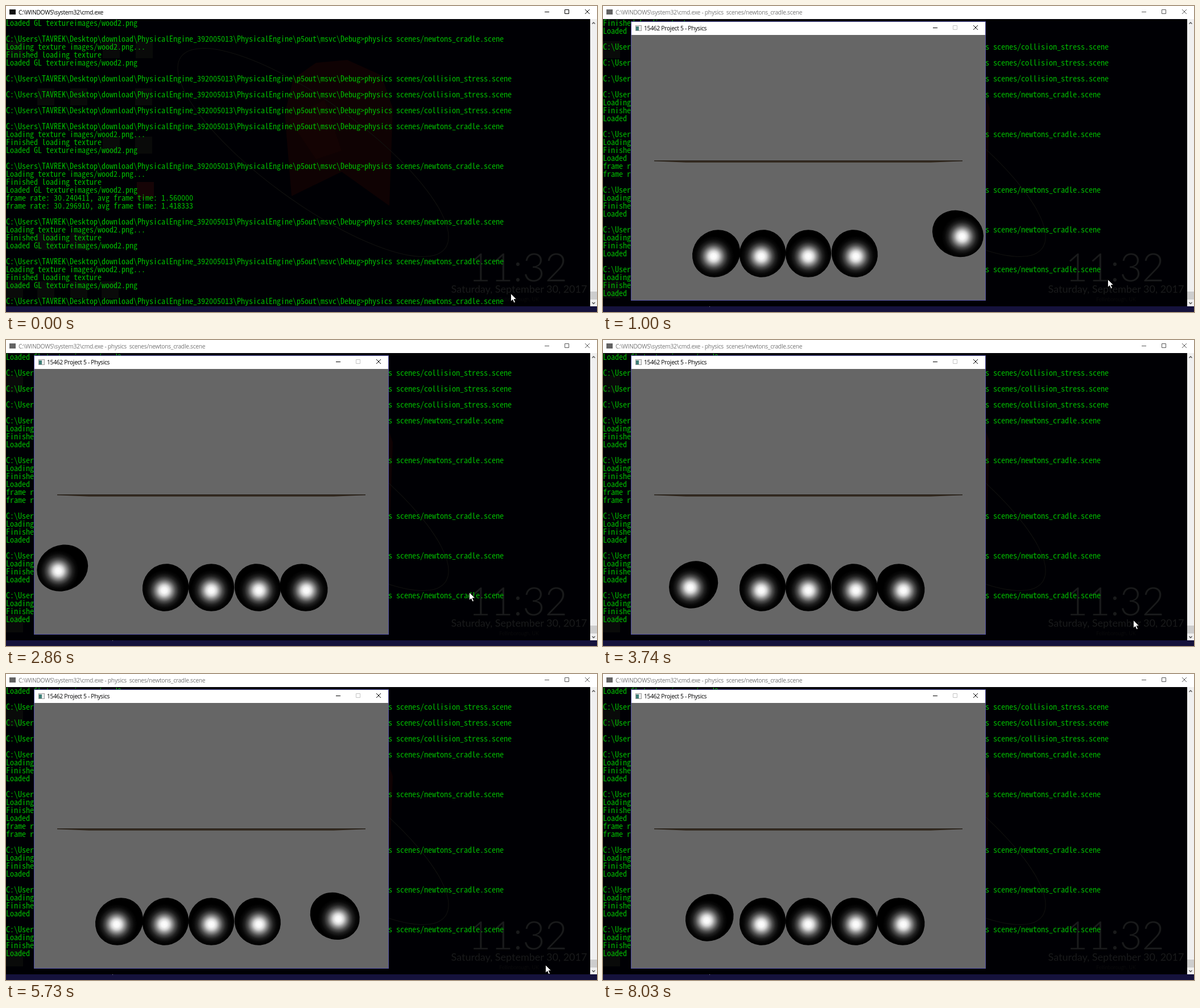
These frames come from a looping animation (1039x539 px, 8.13 s). An HTML page with a canvas:

```html
<!DOCTYPE html>
<html lang="en">
<head>
<meta charset="utf-8">
<title>Newton's cradle</title>
<style>
  html, body { margin: 0; width: 100%; height: 100%; overflow: hidden; background: #15123c; }
  #stage { position: relative; width: 1039px; height: 539px; overflow: hidden; font-family: "Open Sans", "Noto Sans", sans-serif; }
  #stage > *, #app > * { position: absolute; }
  .title { font-size: 10.3px; letter-spacing: -.3px; line-height: 22px; white-space: pre; color: #000; }
  #bar { left: 0; top: 0; width: 1039px; height: 23px; background: #fff; }
  #bar > * { position: absolute; }
  #bar .title { left: 22px; top: 0; }
  #bar.idle .title { color: #777; }
  #bar.idle svg { opacity: .65; }
  #console { left: 0; top: 23px; width: 1027px; height: 506px; background: #000004; overflow: hidden; }
  #console svg { position: absolute; left: 0; top: -23px; }
  #lines { position: absolute; margin: 0; left: 0; top: -1px; line-height: 14px; font-family: "Noto Sans Mono CJK SC", "Noto Sans Mono CJK JP", "Liberation Mono", monospace; font-size: 14px; color: #00bc00; font-variant-ligatures: none; }
  #scroll { left: 1027px; top: 23px; }
  #labels { left: 0; top: 529px; width: 300px; height: 4px; overflow: hidden; color: #b8b8c4; }
  #labels span { position: absolute; top: -10px; font-size: 9px; line-height: 12px; }
  #app { left: 49px; top: 27px; width: 622px; height: 490px; border: 1px solid #5150a4; background: #fff; }
  #app .title { left: 22px; top: 0; }
  #view { left: 0; top: 23px; }
  #mouse { left: 0; top: 0; }
</style>
</head>
<body>
<div id="stage">
  <div id="labels">
    <span style="left:3px">备忘</span><span style="left:45px">Notes 2024</span>
    <span style="left:106px">Download</span><span style="left:172px">scripts</span>
  </div>
  <div id="console">
    <svg width="1039" height="539">
      <g id="icons" fill="#090a09"></g>
      <path d="M490 190 505 128 545 100 600 95 660 122 680 180 674 352 590 292 502 335Z" fill="#0f0203"/>
      <path d="M498 200 560 165 590 255 545 270Z" fill="#140303"/>
      <ellipse cx="540" cy="258" rx="287" ry="89" transform="rotate(36 540 258)" fill="none" stroke="#11110f"/>
      <g fill="#191a1b" font-family="Lato, 'Open Sans', sans-serif" font-weight="300" text-anchor="middle">
        <text x="900" y="485" font-size="68">11:32</text>
        <text x="902" y="505" font-size="18" font-weight="400">Saturday, September 30, 2017</text>
        <text x="902" y="520" font-size="9" fill="#111">Fellinborough, UK</text>
      </g>
    </svg>
    <pre id="lines"></pre>
  </div>
  <svg id="scroll" width="12" height="506">
    <rect width="12" height="506" fill="#f0f0f0"/>
    <rect y="480" width="12" height="14" fill="#cdcdcd"/>
    <path d="M3.5 8.5 6 6 8.5 8.5M3.5 499 6 501.5 8.5 499" fill="none" stroke="#505050" stroke-width="1.4"/>
  </svg>
  <div id="bar">
    <svg width="1039" height="23">
      <rect x="6" y="6" width="11" height="9" fill="#111"/>
      <path d="M947 10.5h8M982.5 6.5h7v7h-7zM1018 6l8 8M1026 6l-8 8" fill="none" stroke="#000"/>
    </svg>
    <span class="title" id="caption"></span>
  </div>
  <div id="app">
    <svg width="622" height="23">
      <rect x="7.5" y="6.5" width="10" height="9" fill="#eee" stroke="#999"/>
      <rect x="8" y="8" width="5" height="7" fill="#3f7f78"/>
      <path d="M530 10.5h8M601 6l8 8M609 6l-8 8" stroke="#000" fill="none"/>
      <path d="M565.5 6.5h7v7h-7z" stroke="#c4c4c4" fill="none"/>
    </svg>
    <span class="title">15462 Project 5 - Physics</span>
    <canvas id="view" width="622" height="467"></canvas>
  </div>
  <svg id="mouse" width="14" height="20">
    <path d="M.5 .5V14.5L3.7 11.5 6 16.8 8.4 15.8 6.1 10.6H10.5Z" fill="#fff" stroke="#000" stroke-width=".8"/>
  </svg>
</div>
<script>
const LOOP = 8130, OPEN = 430;
const $ = id => document.getElementById(id);
const clamp = (v, a = 0, b = 1) => Math.min(b, Math.max(a, v));

// Screen updates: first time, last time, number of steps
const runs = [[0, 0, 1], [100, 870, 8], [1000, 1750, 8], [1870, 2650, 8], [2740, 2740, 1], [2860, 3520, 7],
  [3620, 3860, 3], [4040, 4410, 5], [4510, 4850, 4], [4950, 5730, 8], [5850, 6630, 8],
  [6730, 6730, 1], [6850, 7490, 7], [7610, 8030, 5]];
const ticks = runs.flatMap(([a, b, n]) =>
  Array.from({ length: n }, (_, i) => a + (n > 1 ? (b - a) * i / (n - 1) : 0)));

// Time, swing phase: sine > 0 lifts the right ball, < 0 the left one
const swing = [[0, 1.571], [890, 1.571], [1000, 1.6], [1750, 2.866], [2650, 4.315], [2860, 4.59], [3520, 5.522],
  [3860, 6.068], [4410, 6.966], [4850, 7.657], [5730, 8.849], [6630, 10.314], [6850, 10.598], [7490, 11.629], [8030, 12.449]];
// Time, x, y of the pointer tip
const pointer = [[0, 887, 506], [600, 887, 506], [870, 887, 481], [1000, 887, 481], [1600, 814, 444],
  [2860, 814, 444], [3500, 932, 493], [4950, 932, 493], [5700, 948, 512], [5850, 948, 512],
  [6600, 958, 519], [6850, 960, 520], [7490, 971, 531], [8030, 976, 540]];

function at(keys, t, col = 1) {
  const i = keys.findIndex(k => k[0] > t);
  if (i < 0) return keys[keys.length - 1][col];
  const a = keys[i - 1], b = keys[i];
  return a[col] + (b[col] - a[col]) * (t - a[0]) / (b[0] - a[0]);
}

const prompt = "C:\\Users\\TAVREK\\Desktop\\download\\PhysicalEngine_392005013\\PhysicalEngine\\p5out\\msvc\\Debug>physics scenes/";
const cradle = prompt + "newtons_cradle.scene", stress = prompt + "collision_stress.scene";
const load = ["Loading texture images/wood2.png...", "Finished loading texture", "Loaded GL textureimages/wood2.png"];
const rates = ["frame rate: 30.240411, avg frame time: 1.560000", "frame rate: 30.296910, avg frame time: 1.418333"];
const run = [cradle, ...load, ""];
const log = [load[2], "", ...run, stress, "", stress, "", stress, "",
  ...run, cradle, ...load, ...rates, "", ...run, ...run, ...run];

const shell = "C:\\WINDOWS\\system32\\cmd.exe";
const lines = $("lines"), ctx = $("view").getContext("2d");

// Pick the size that gives a 7px character cell
const pen = document.createElement("canvas").getContext("2d");
pen.font = "100px " + getComputedStyle(lines).fontFamily;
lines.style.fontSize = 700 / pen.measureText("M").width + "px";

$("icons").innerHTML = [[15, 77], [185, 77], [243, 77], [70, 160], [128, 160], [242, 160], [185, 245], [242, 245],
  [245, 325], [70, 415], [128, 415], [15, 500], [70, 500], [128, 500], [183, 500]]
  .map(([x, y]) => `<rect x="${x - 15}" y="${y - 15}" width="30" height="30"${y === 325 ? ' fill="#160406"' : ""}/>`).join("");

// Wide-angle view: a sphere stretches away from the centre of the picture
function ball(x, y) {
  const dx = x - 361, dy = y - 285, b = 40.2;
  const a = b * Math.sqrt(1 + (dx * dx + dy * dy) / 275000);
  const gx = x + dx * .028, gy = y + 5;
  const g = ctx.createRadialGradient(gx, gy, 0, gx, gy, 36);
  [[0, 255], [.14, 246], [.26, 212], [.4, 142], [.55, 76], [.7, 32], [.85, 9], [1, 0]]
    .forEach(([p, v]) => g.addColorStop(p, `rgb(${v},${v},${v})`));
  ctx.fillStyle = g;
  ctx.beginPath();
  ctx.ellipse(x, y, a, b, Math.atan2(dy, dx), 0, 7);
  ctx.fill();
}

function wedge(color, points) {
  ctx.fillStyle = color;
  ctx.beginPath();
  points.forEach(p => ctx.lineTo(...p));
  ctx.fill();
}

function drawScene(t) {
  ctx.setTransform(1, 0, 0, 1, -50, -51);
  ctx.fillStyle = "#666";
  ctx.fillRect(50, 51, 622, 467);
  wedge("#352b20", [[90, 272], [632, 272], [632, 273.3], [576, 275.8], [146, 275.8], [90, 273.3]]);
  wedge("#211b15", [[90, 272.3], [632, 272.3], [632, 273.2], [90, 273.2]]);

  const s = Math.sin(at(swing, t)), R = 161.8, dx = 100.5 * s;
  const k = clamp((t - 6850) / 640);
  const lift = R - Math.sqrt(R * R - dx * dx) + 6.5 * k * k * (3 - 2 * k);
  [199, 280.5, 361, 442.3, 523.5].forEach((x, i) => {
    const moves = s < 0 ? i === 0 : i === 4;
    ball(moves ? x + dx : x, moves ? 436 - lift : 436);
  });
}

function render(now) {
  const time = now % LOOP;
  const t = ticks.filter(v => v <= time).pop();
  const open = t >= OPEN;
  const rows = t < 100 ? 0 : t < 600 ? 1 : t < 1200 ? 4 : 5;
  // Output that has not been printed yet stays empty
  const printed = rows < 4 ? 36 : log.length;
  lines.textContent = log.slice(rows, Math.min(printed, rows + 36)).join("\n");
  $("caption").textContent = rows ? shell + " - physics  scenes/newtons_cradle.scene" : shell;
  $("bar").className = open ? "idle" : "";
  $("app").style.visibility = $("labels").style.visibility = open ? "visible" : "hidden";
  $("mouse").style.transform = `translate(${Math.round(at(pointer, t, 1))}px, ${Math.round(at(pointer, t, 2))}px)`;
  if (open) drawScene(t);
}

const start = performance.now();
function loop() {
  render(performance.now() - start);
  requestAnimationFrame(loop);
}
loop();
</script>
</body>
</html>
```
